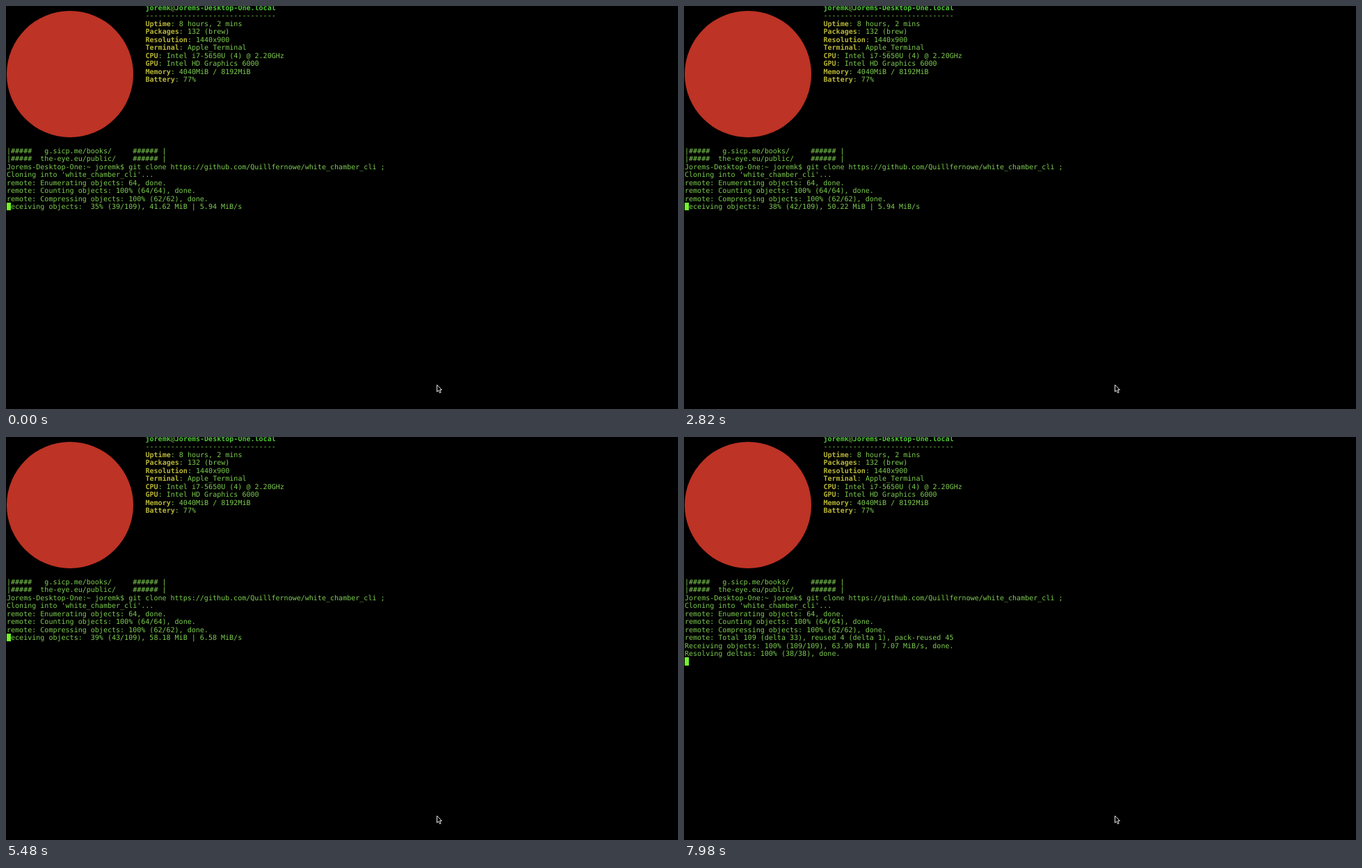
Animation, 966 px wide and 580 px high, one loop 8000 ms. Source, as an HTML page:

```html
<!DOCTYPE html>
<html lang="en">
<head>
<meta charset="utf-8">
<title>Terminal clone</title>
<style>
  html, body { margin: 0; width: 100%; height: 100%; overflow: hidden; background: #000; }
  #stage { position: relative; width: 966px; height: 580px; overflow: hidden; background: #000; }
  pre {
    position: absolute; left: 1px; margin: 0;
    font: 10.04px/11.44px "DejaVu Sans Mono", monospace;
    font-variant-ligatures: none; text-rendering: geometricPrecision;
    color: #7dcc50;
  }
  #info { left: 200.5px; top: -2px; }
  #log { top: 204px; }
  #info b { color: #b8b638; }
  #info b.host { color: #50c638; }
  #badge {
    position: absolute; left: 1px; top: 7px; width: 182px; height: 182px;
    border-radius: 50%; background: #bd3325;
  }
  #caret { position: absolute; left: 1px; width: 6px; height: 11.44px; background: #74f42c; }
  #pointer { position: absolute; left: 618px; top: 544px; }
</style>
</head>
<body>
<div id="stage">
  <div id="badge"></div>
  <pre id="info"></pre>
  <pre id="log"></pre>
  <div id="caret"></div>
  <svg id="pointer" width="10" height="15" viewBox="0 0 10 15">
    <path d="M1.5 1.2V11.2L3.8 9.1L5.4 12.8L7.2 12L5.6 8.4H8.5Z"
      fill="#000" stroke="#e6e6e6" stroke-width="1" stroke-linejoin="round"/>
  </svg>
</div>
<script>
const LOOP = 8000, ROW = 11.44, TOP = -3, LOG_ROW = 18;
const byId = id => document.getElementById(id);
const user = "joremk", host = "Jorems-Desktop-One";

const facts = {
  Uptime: "8 hours, 2 mins",
  Packages: "132 (brew)",
  Resolution: "1440x900",
  Terminal: "Apple_Terminal",
  CPU: "Intel i7-5650U (4) @ 2.20GHz",
  GPU: "Intel HD Graphics 6000",
  Memory: "4040MiB / 8192MiB",
  Battery: "77%"
};
byId("info").innerHTML = [
  `<b class="host">${user}</b>@<b class="host">${host}.local</b>`,
  "-".repeat(31),
  ...Object.entries(facts).map(([label, value]) => `<b>${label}</b>: ${value}`)
].join("\n");

const history = [
  "|#####   g.sicp.me/books/     ###### |",
  "|#####  the-eye.eu/public/    ###### |",
  `${host}:~ ${user}$ git clone https://github.com/Quillfernowe/white_chamber_cli ;`,
  "Cloning into 'white_chamber_cli'...",
  "remote: Enumerating objects: 64, done.",
  "remote: Counting objects: 100% (64/64), done.",
  "remote: Compressing objects: 100% (62/62), done."
];

// The caret hides the first letter of the progress line.
const progress = (count, size, rate) => [
  ` eceiving objects:  ${Math.floor(count / 109 * 100)}% (${count}/109), ${size} MiB | ${rate} MiB/s`
];
const finished = [
  "remote: Total 109 (delta 33), reused 4 (delta 1), pack-reused 45",
  "Receiving objects: 100% (109/109), 63.90 MiB | 7.07 MiB/s, done.",
  "Resolving deltas: 100% (38/38), done.",
  ""
];
const steps = [
  [0, progress(39, "41.62", "5.94")],
  [120, progress(40, "41.62", "5.94")],
  [2560, progress(42, "50.22", "5.94")],
  [5240, progress(43, "58.18", "6.58")],
  [7060, finished]
];

let shown;
function draw(now) {
  const time = now % LOOP;
  const lines = steps.findLast(([start]) => start <= time)[1];
  if (lines !== shown) {
    shown = lines;
    const all = [...history, ...lines];
    byId("log").textContent = all.join("\n");
    byId("caret").style.top = TOP + (LOG_ROW + all.length - 1) * ROW + "px";
  }
}
const begin = performance.now();
function tick() {
  draw(performance.now() - begin);
  requestAnimationFrame(tick);
}
tick();
</script>
</body>
</html>
```
